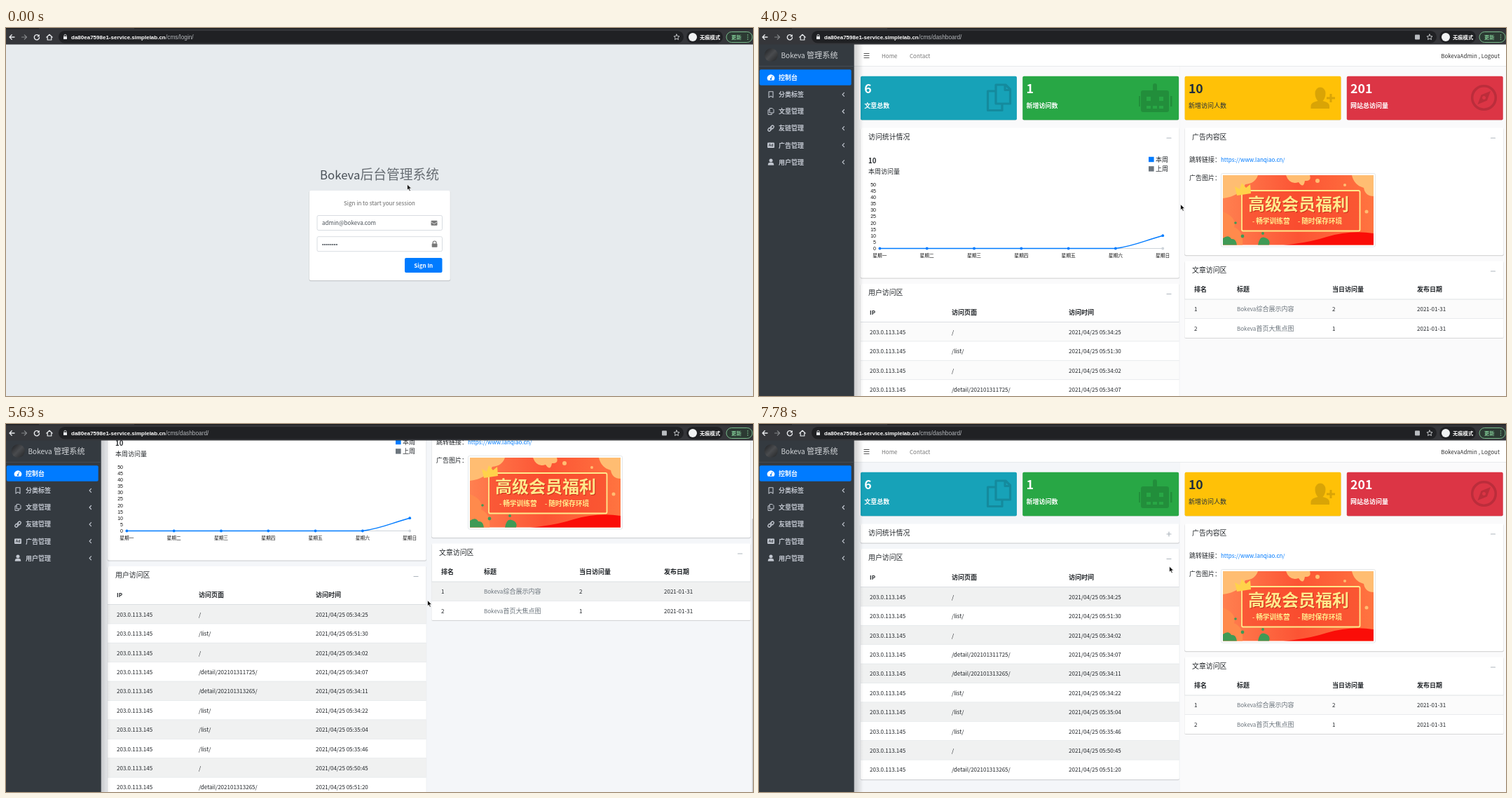
An HTML page that plays this animation: 1066 by 525 pixels, repeating every 8000 ms.

```html
<!DOCTYPE html>
<html lang="zh-CN">
<head>
<meta charset="utf-8">
<title>后台管理系统</title>
<style>
html, body { margin: 0; width: 100%; height: 100%; overflow: hidden; background: #e7ebee; }
svg { display: block; width: 100vw; height: 100vh; }
text { font-family: "Noto Sans CJK SC", "Noto Sans CJK JP", "Noto Sans CJK", sans-serif; white-space: pre; }
.ui { font-family: "Liberation Sans", Arial, sans-serif; }
.line { fill: none; stroke-linecap: round; stroke-linejoin: round; }
</style>
</head>
<body>
<svg id="stage" viewBox="0 0 1066 525"></svg>
<script>
const LOOP = 8000;
const BRAND = 'Bokeva';
const IP = '203.0.113.145';
const BLUE = '#007bff';

// Tracks: [start ms, value...]; each value holds until the next step.
const CURSOR = [
  [0, 572.5, 223, 'arrow'], [270, 541, 219.5, 'arrow'], [530, 486.5, 240.5, 'arrow'],
  [800, 598, 361.5, 'arrow'], [1070, 607, 347, 'arrow'], [1340, 607, 343, 'hand'],
  [1610, 606, 342, 'hand'], [3220, 601, 332, 'arrow'], [3490, 601, 275, 'arrow'],
  [3750, 601.5, 251.5, 'arrow'], [6160, 601, 240, 'arrow'], [6430, 598, 215, 'arrow'],
  [6700, 591.5, 185, 'arrow'], [6970, 585, 153, 'hand'], [7780, 585.5, 203, 'arrow']
];
const SCROLL = [[0, 0], [4290, 14], [4560, 91], [4830, 140], [5100, 170], [5360, 178],
  [5630, 162], [5900, 108], [6160, 52], [6430, 14], [6700, 0]];
const CHART = [[0, 4.4], [3220, 8.8], [3490, 9.7], [3750, 9.9], [4020, 10]];
const COLLAPSE = [[0, 0], [7240, 40], [7510, 150], [7780, 187]];
const BUTTON = [[0, BLUE], [1340, '#0069d9'], [1880, '#0062cc'], [2150, '#0069d9']];

const at = (track, t) => track.filter(step => step[0] <= t).pop().slice(1);

// Latin runs are set smaller so both scripts share one nominal size.
function text(x, y, str, size = 9, fill = '#212529', weight = 400, anchor = 'start') {
  const runs = str.replace(/[\x20-\x7e]+/g, m => `<tspan font-size="${size * .893}">${m}</tspan>`);
  return `<text x="${x}" y="${y}" font-size="${size}" fill="${fill}" font-weight="${weight}" text-anchor="${anchor}">${runs}</text>`;
}
const ui = (x, y, str, size, fill, weight = 400, anchor = 'start') =>
  `<text class="ui" x="${x}" y="${y}" font-size="${size}" fill="${fill}" font-weight="${weight}" text-anchor="${anchor}">${str}</text>`;
const rect = (x, y, w, h, fill, rx = 0, more = '') =>
  `<rect x="${x}" y="${y}" width="${w}" height="${h}" rx="${rx}" fill="${fill}" ${more}/>`;
const circle = (x, y, r, fill, more = '') => `<circle cx="${x}" cy="${y}" r="${r}" fill="${fill}" ${more}/>`;
const path = (d, fill, more = '') => `<path d="${d}" fill="${fill}" ${more}/>`;
const line = (d, stroke, width = 1) => `<path class="line" d="${d}" stroke="${stroke}" stroke-width="${width}"/>`;
const group = (id, body, more = '') => `<g id="${id}" ${more}>${body}</g>`;
const card = (x, y, w, h) =>
  rect(x - .4, y + .4, w + .8, h + .9, '#000', 2, 'opacity=".14"') + rect(x, y, w, h, '#fff', 2);
const minus = (x, y) => line(`M${x - 3},${y}h6`, '#adb5bd', 1.2);

function browser() {
  const white = '#e8eaed', grey = '#85878a';
  return rect(0, 0, 1066, 23.5, '#35363a') + rect(0, 0, 1066, 1.5, '#1f2023') + rect(47, 0, 136, 1.5, '#35363a') +
    rect(75, 4, 892, 17.5, '#202124', 8.7) +
    line('M12,13H5M8.2,9.8L5,13l3.2,3.2', white, 1.3) +
    line('M22.5,13h7M26.3,9.8l3.2,3.2l-3.2,3.2', grey, 1.2) +
    group('reload', line('M46.6,10.8a3.6,3.6 0 1 0 .9,3', white, 1.4) + path('M47.8,9v3.6h-3.6z', white)) +
    group('stop', line('M40.8,9.8l6.4,6.4m0,-6.4l-6.4,6.4', white, 1.4)) +
    line('M57.8,13.2L62,9.3l4.2,3.9M59.2,12.6v4.4h5.6v-4.4', white, 1.2) +
    rect(82, 12, 5, 4, white, .6) + line('M83,12v-1.2a1.5,1.5 0 0 1 3,0v1.2', white, .9) +
    ui(93, 15.8, 'da80ea7598e1-service.simplelab.cn', 8, '#fff', 700) +
    '<text id="route" class="ui" x="228" y="15.8" font-size="8.3" fill="#b4b7bb"></text>' +
    group('translate', rect(936, 9.5, 7, 7, '#b9bcc0', 1)) +
    line('M957,9l1.2,2.6 2.8,.3-2.1,1.9.6,2.8-2.5,-1.4-2.5,1.4.6,-2.8-2.1,-1.9 2.8,-.3z', white, .8) +
    rect(971, 4, 52, 17.5, '#202124', 8.7) + circle(980, 13, 6, '#f1f3f4') + text(990, 15.7, '无痕模式', 7.3, '#fff', 700) +
    rect(1028, 5.5, 37, 15, '#2c3a33', 7.5, 'stroke="#81c995" stroke-width=".9"') +
    text(1035, 15.7, '更新', 7.2, '#81c995', 700) +
    [10, 13, 16].map(y => circle(1058.5, y, .8, '#81c995')).join('');
}

function login() {
  const field = y => rect(444, y, 178.5, 21, '#fff', 2, 'stroke="#ced4da" stroke-width=".8"');
  const dots = Array.from({ length: 8 }, (_, i) => circle(452.3 + i * 2.8, 309, 1.1, '#495057')).join('');
  return rect(0, 23, 1066, 502, '#e7ebee') +
    `<text x="533" y="216" text-anchor="middle" font-size="18.75" font-weight="300" fill="#676d73"><tspan font-size="16.8" font-weight="400" fill="#495057">${BRAND}</tspan>后台管理系统</text>` +
    card(433, 232, 200.8, 128) +
    text(533, 253, 'Sign in to start your session', 9, '#666', 400, 'middle') +
    field(267.5) + text(451, 281.3, `admin@${BRAND.toLowerCase()}.com`, 9, '#495057') +
    field(297.7) + dots +
    rect(606.5, 274.7, 9, 7, '#777', 1) + line('M606.8,276.8l4.2,2.8l4.2,-2.8', '#fff', .7) +
    rect(607.7, 307.6, 7.8, 5.2, '#777', .8) + line('M609.2,308v-1.6a2.4,2.4 0 0 1 4.8,0v1.6', '#777', 1.2) +
    rect(569, 328, 53.5, 21, BLUE, 2, 'id="signIn"') +
    text(595.7, 342, 'Sign In', 9, '#fff', 700, 'middle');
}

function sidebar() {
  const items = ['控制台', '分类标签', '文章管理', '友链管理', '广告管理', '用户管理'];
  const tone = '#c2c7d0';
  const icons = [
    path('M-4.2,4a5.2,5.2 0 1 1 8.4,0z', '#fff') + line('M0,1.8L1.8,-2', BLUE, .9) + circle(0, 2, 1.2, BLUE),
    line('M-3,-4.2h6v8.4l-3,-2l-3,2z', tone, 1.1),
    line('M-1.5,-4.5h3.5l2,2v4.5h-5.5zM-1.8,-2.2h-2.2v6.7h5.2v-2', tone, 1),
    line('M-.6,1a2.1,2.1 0 0 1 0,-2.6l1.6,-1.8a1.8,1.8 0 0 1 2.8,2.4l-1.4,1.6M.6,-1a2.1,2.1 0 0 1 0,2.6l-1.6,1.8a1.8,1.8 0 0 1 -2.8,-2.4l1.4,-1.6', tone, 1.4),
    rect(-5, -3.7, 10, 7.4, tone, 1) + ui(0, 2, 'Ad', 5.4, '#343a40', 700, 'middle'),
    circle(0, -2.2, 2.5, tone) + path('M-4.2,4.5v-1.4a2.6,2.6 0 0 1 2.6,-2.4h3.2a2.6,2.6 0 0 1 2.6,2.4v1.4z', tone)
  ];
  const rows = items.map((label, i) => {
    const y = 70.8 + i * 24.1;
    return `<g transform="translate(17 ${y})">${icons[i]}</g>` +
      text(28, y + 3.3, label, 9, i ? tone : '#fff', 700) +
      (i ? line(`M121.5,${y - 2.5}l-2.4,2.5l2.4,2.5`, tone, 1.2) : '');
  }).join('');
  return rect(135, 23, 14, 502, 'url(#shade)') + rect(0, 23, 135.7, 502, '#343a40') +
    circle(17.3, 38.5, 9.6, 'url(#portrait)') +
    text(31.5, 43, `${BRAND} 管理系统`, 11.2, '#d3d6d9', 300) +
    rect(0, 54, 135.7, .7, '#4b545c') + rect(.8, 59.2, 130.9, 22.6, BLUE, 2) + rows;
}

function stats() {
  const shade = 'rgba(0,0,0,.15)';
  const icons = [
    line('M338,81h14l6.5,6.5v20.5h-20.5zM351,81.5v7h7M336,90h-9.5v27.5h20.5v-7.5', shade, 3.2),
    path('M548,89h14v-7a3,3 0 0 1 6,0v7h14a3,3 0 0 1 3,3v25a3,3 0 0 1 -3,3h-34a3,3 0 0 1 -3,-3v-25a3,3 0 0 1 3,-3zM542,97h2v15h-2zM587,97h2.5v15h-2.5zM553,98v6h6v-6zM571,98v6h6v-6zM553,111v4h6v-4zM562,111v4h6v-4zM571,111v4h6v-4z', shade, 'fill-rule="evenodd"'),
    path('M787.5,115v-4q0,-5 10,-7q-4,-4 -4,-11a7.5,8.5 0 0 1 15,0q0,7 -4,11q9.5,2 9.5,7v4zM810,98.5h4.5v-4.5h3v4.5h4.5v3h-4.5v4.5h-3v-4.5h-4.5z', shade),
    circle(1034.5, 99.5, 16.8, 'none', `stroke="${shade}" stroke-width="3.6"`) +
      path('M1044,90l-5,13.5l-13.5,5.5l5,-13.5zM1034.5,97a2.5,2.5 0 1 0 .1,0z', shade, 'fill-rule="evenodd"')
  ];
  return [
    [145, '#17a2b8', '6', '文章总数'], [376.2, '#28a745', '1', '新增访问数'],
    [607.6, '#ffc107', '10', '新增访问人数'], [838.8, '#dc3545', '201', '网站总访问量']
  ].map(([x, color, count, label], i) => {
    const ink = i === 2 ? '#1f2d3d' : '#fff';
    return rect(x, 69.5, 222.9, 62.3, '#0002', 2) + rect(x, 68.8, 222.9, 62.4, color, 2) +
      text(x + 5.3, 93.3, count, 19.8, ink, 900) + text(x + 5.3, 113.8, label, 9, ink, i === 2 ? 400 : 700) + icons[i];
  }).join('');
}

function chart() {
  const yLabels = Array.from({ length: 11 }, (_, i) =>
    ui(167, 316.9 - i * 9.1, i * 5, 7, '#111', 400, 'end')).join('');
  const days = [...'一二三四五六日'].map((d, i) => {
    const x = 172.4 + i * 67.3;
    return text(x, 326.6, '星期' + d, 6.73, '#111', 400, 'middle') +
      (i < 6 ? circle(x, 314.5, 1.9, BLUE) : '');
  }).join('');
  const body = text(156, 192.7, '10', 10.7, '#212529', 700) + text(156, 207.5, '本周访问量') +
    rect(556, 183.8, 7.6, 7.4, BLUE) + text(566, 190.8, '本周') +
    rect(556, 197.2, 7.6, 7.4, '#6c757d') + text(566, 204.3, '上周') +
    line('M172,314.5H576', '#ced4da', 1.2) + circle(576.2, 314.5, 1.9, '#ced4da') +
    '<path id="curve" class="line" stroke="#007bff" stroke-width="1.4"/>' + yLabels + days +
    circle(576.2, 0, 1.9, BLUE, 'id="tip"');
  return group('chartCard', card(145, 142.5, 454.6, 214)) +
    text(156, 158.5, '访问统计情况', 9.9) + minus(585, 157) +
    group('plus', line('M585,154v6', '#adb5bd', 1.2)) +
    `<clipPath id="bodyClip"><rect id="bodyBox" x="145" y="169" width="455" height="187"/></clipPath>` +
    group('chartBody', body, 'clip-path="url(#bodyClip)"');
}

function table(side, x, w, top, cols, heads, rows, tones = []) {
  const h = 27.4;
  return cols.map((cx, i) => text(cx, top - 10.6, heads[i], 9, '#212529', 700)).join('') +
    rows.map((row, r) => {
      const y = top + r * h;
      return rect(x, y, w, h, r % 2 ? '#fff' : '#f0f1f1', 0, r % 2 ? '' : `class="stripe-${side}"`) +
        rect(x, y - .4, w, .8, r ? '#e4e7ea' : '#d5d9dd') +
        row.map((cell, i) => text(cols[i], y + 17.3, cell, 9, tones[i] || '#212529')).join('');
    }).join('');
}

function visitors() {
  const a = '/detail/202101311725/', b = '/detail/202101313265/', l = '/list/';
  const visits = [['/', '34:25'], [l, '51:30'], ['/', '34:02'], [a, '34:07'], [b, '34:11'],
    [l, '34:22'], [l, '35:04'], [l, '35:46'], ['/', '50:45'], [b, '51:20']];
  return card(145, 365, 454.6, 329) + text(156, 380.8, '用户访问区', 9.9) + minus(585, 379.5) +
    table('left', 145, 454.6, 419.5, [158, 275, 442], ['IP', '访问页面', '访问时间'],
      visits.map(([page, time]) => [IP, page, '2021/04/25 05:' + time]));
}

function banner() {
  const gold = '#ffe98c', green = '#3f9a55', peach = '#ffbd72';
  return rect(659.5, 207.5, 220, 104.5, '#fff', 2, 'stroke="#dee2e6" stroke-width=".8"') +
    '<clipPath id="adClip"><rect x="662" y="210" width="215" height="99.5"/></clipPath><g clip-path="url(#adClip)">' +
    rect(662, 210, 215, 100, 'url(#adFill)') +
    path('M662,210h50q-4,12 -18,13q-8,17 -32,20z', peach) +
    path('M662,262q20,8 16,22q14,6 12,26h-28z', '#ff8a4c') +
    path('M752,210h34q3,9 -7,8q-2,12 -9,2q-13,4 -18,-10z', peach) +
    path('M846,210h31v30q-12,0 -14,-12q-14,-4 -17,-18z', peach) +
    path('M748,310q38,-4 62,-12q34,-10 67,-5v17z', '#fa0d08') +
    path('M662,310v-10q8,-6 12,1q7,-1 8,9zM712,310q2,-14 10,-11q9,3 6,11z', green) +
    circle(680, 278, 1.8, green) + circle(690, 297, 2.4, green) + circle(719, 293, 2, green) +
    circle(797, 218, 3, peach) + circle(836, 224, 2, peach) + circle(867, 262, 2.5, peach) +
    rect(689, 232, 168.5, 57.5, '#f9482c', 2, `fill-opacity=".6" stroke="${gold}" stroke-width="1.8"`) +
    path('M682,239l-3,-13l7,4l3,-9l6,7l6,-5l1,13z', '#ffd24a') +
    text(699, 261.2, '高级会员福利', 24, '#c9301a', 900) + text(698, 260.2, '高级会员福利', 24, gold, 900) +
    text(704, 279, '- 畅学训练营', 9.7, gold, 700) + text(769, 279, '- 随时保存环境', 9.7, gold, 700) + '</g>';
}

function dashboard() {
  const date = '2021-01-31';
  return rect(135, 23, 465.5, 800, '#f4f6f9', 0, 'id="backLeft"') +
    rect(600.5, 23, 466, 800, '#f4f6f9', 0, 'id="backRight"') +
    rect(135, 23, 931, 31.5, '#fff') + rect(135, 54.2, 931, .7, '#dee2e6') +
    [36.5, 39.5, 42.5].map(y => line(`M150,${y}h7`, '#555', 1.1)).join('') +
    text(175, 42.7, 'Home', 9, '#777') + text(215, 42.7, 'Contact', 9, '#777') +
    text(1057, 42.7, `${BRAND}Admin , Logout`, 9, '#333', 400, 'end') +
    stats() + chart() + group('visitors', visitors()) +
    card(607.6, 142.5, 454.8, 181.5) + text(618, 158.5, '广告内容区', 9.9) + minus(1047.5, 157) +
    text(614, 190.6, '跳转链接：') + text(659, 190.6, 'https://www.lanqiao.cn/', 9, BLUE) +
    text(614, 217.3, '广告图片：') + banner() +
    card(607.6, 332.5, 454.8, 109.3) + text(618, 348.5, '文章访问区', 9.9) + minus(1047.5, 347) +
    table('right', 607.6, 454.8, 387, [621, 682, 818, 939], ['排名', '标题', '当日访问量', '发布日期'],
      [['1', BRAND + '综合展示内容', '2', date], ['2', BRAND + '首页大焦点图', '1', date]], [, '#6c757d']);
}

const pointers = group('arrow', path('M0,0v8.3l1.9,-1.7l1.4,3.2l1.5,-.7l-1.4,-3.1h2.7z', '#111', 'stroke="#fff" stroke-width=".7"')) +
  group('hand', path('M-1,.8q.9,-1.3 1.8,0v3.2q1,-.7 1.5,.2q1,-.5 1.4,.4q1.2,-.3 1.2,.9v2.3l-1,2.2h-4.4l-2.7,-4q0,-1.2 1,-.9l1.2,1z', '#fff', 'stroke="#222" stroke-width=".8"'));

const stage = document.getElementById('stage');
stage.innerHTML = `<defs>
  <linearGradient id="shade"><stop stop-color="#000" stop-opacity=".2"/><stop offset="1" stop-color="#000" stop-opacity="0"/></linearGradient>
  <linearGradient id="adFill"><stop stop-color="#ff8050"/><stop offset=".5" stop-color="#fc5434"/><stop offset="1" stop-color="#ff7440"/></linearGradient>
  <linearGradient id="portrait" x2="1" y2="1"><stop stop-color="#1d1f22"/><stop offset=".5" stop-color="#4a4c4f"/><stop offset="1" stop-color="#222426"/></linearGradient>
  </defs>` + group('login', login()) +
  group('dashboard', group('page', dashboard()) + sidebar() + rect(1064.7, 25, 1.3, 391, '#c6c8cb', .6, 'id="thumb"')) +
  browser() + pointers;

const $ = id => document.getElementById(id);
const set = (id, name, value) => $(id).setAttribute(name, value);
const show = (id, on) => set(id, 'display', on ? 'inline' : 'none');
const move = (id, x, y) => set(id, 'transform', `translate(${x} ${y})`);

function paintSide(side, id, pale) {
  set(id, 'fill', pale ? '#fafafb' : '#f4f6f9');
  document.querySelectorAll('.stripe-' + side).forEach(s => s.setAttribute('fill', pale ? '#fbfbfb' : '#f0f1f1'));
}

function render(t) {
  const inside = t >= 2950;
  show('login', !inside);
  show('dashboard', inside);
  show('translate', inside);
  const loading = t >= 2150 && !inside;
  show('stop', loading);
  show('reload', !loading);
  $('route').textContent = inside ? '/cms/dashboard/' : '/cms/login/';
  set('signIn', 'fill', at(BUTTON, t)[0]);

  const [scroll] = at(SCROLL, t);
  move('page', 0, -scroll);
  move('thumb', 0, Math.min(scroll * .78, 110));
  show('thumb', t >= 4290 && t < 6970);
  const early = t < 4290;
  paintSide('left', 'backLeft', early || (t >= 6700 && t < 7240));
  paintSide('right', 'backRight', early || t >= 6700);

  const rise = at(CHART, t)[0] * 1.83, y = 314.5 - rise;
  set('curve', 'd', `M172.4,314.5H508.9C536,${314.5 - rise * .2} 549.2,${y + rise * .4} 576.2,${y}`);
  set('tip', 'cy', y);

  const [lift] = at(COLLAPSE, t);
  move('visitors', 0, -lift);
  set('bodyBox', 'height', 187 - lift);
  const [shadow, face] = $('chartCard').children;
  shadow.setAttribute('height', 214.9 - lift);
  face.setAttribute('height', 214 - lift);
  show('plus', lift > 0);

  const [x, cy, kind] = at(CURSOR, t);
  for (const id of ['arrow', 'hand']) {
    show(id, id === kind);
    move(id, x, cy);
  }
}

const start = performance.now();
function tick() {
  render((performance.now() - start) % LOOP);
  requestAnimationFrame(tick);
}
tick();
</script>
</body>
</html>
```
